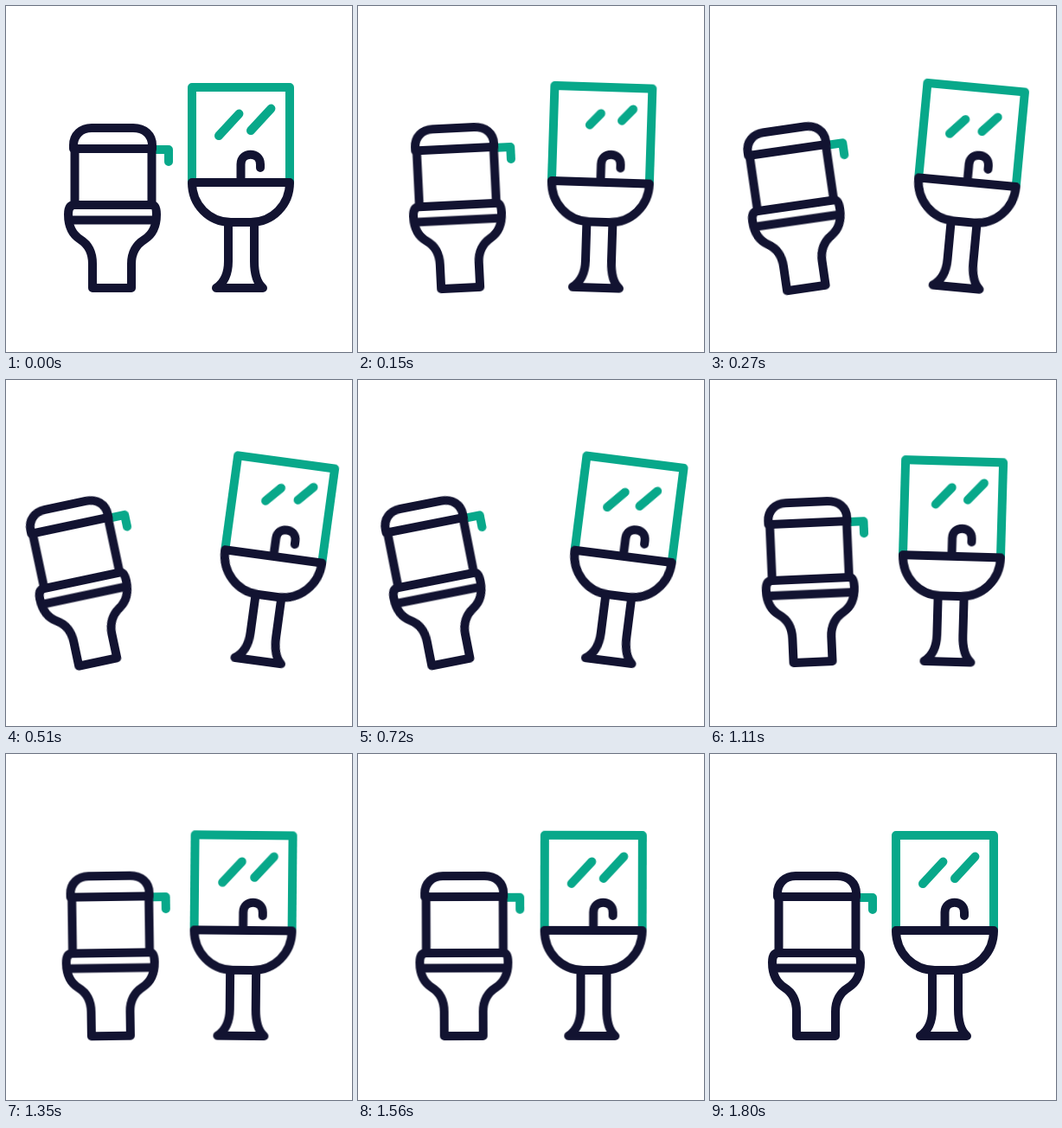
Write an HTML page that moves like this. It is 400 px wide and 400 px high and loops after 3.83 s.

```html
<!DOCTYPE html>
<html lang="en">
<head>
<meta charset="utf-8">
<title>Bathroom</title>
<style>
  html, body { margin: 0; width: 100%; height: 100%; overflow: hidden; background: #fff; }
  svg { display: block; width: 100%; height: 100%; }
  path { fill: none; stroke: #121331; stroke-width: 10; stroke-linecap: round; stroke-linejoin: round; }
  .accent { stroke: #08a88a; }
  .glint { stroke-dasharray: 34.6 22.4; }
  #toilet { transform-origin: 122.5px 326px; }
  #sink { transform-origin: 270px 326px; }
</style>
</head>
<body>
<svg viewBox="0 0 400 400">
  <g id="toilet">
    <path class="accent" d="M172 166H188V180"/>
    <path d="M78 165V161C78 149 87 141 99 141H147C160 141 169 149 169 161V165Z"/>
    <path d="M79.5 165V230M168.5 165V230"/>
    <path d="M79 230C74 230 72 234 72 241C72 257 78 265 86 270S100 284 100 298V326H145V298C145 284 152 275 160 270S174 257 174 241C174 234 173 230 168 230Z"/>
    <path d="M73 247.5H173"/>
  </g>
  <g id="sink">
    <path class="accent" d="M215 204V94H328V204"/>
    <path class="accent glint" d="M246 150L269.5 124.5"/>
    <path class="accent glint" d="M283 144L306.5 118.5"/>
    <path d="M271.5 203V183C271.5 168 294 168 294 183V187"/>
    <path d="M215 204H328C328 230 308 250 283 250H260C235 250 215 230 215 204Z"/>
    <path d="M257 252V295C257 309 252 320 243 326H297C290 320 287 309 287 295V252"/>
  </g>
</svg>
<script>
  const LOOP = 3830, STEP = 30, MOVE = 1800, PEAK = 540;
  const RISE = 'cubic-bezier(.4, 0, .34, 1)';
  const SETTLE = 'cubic-bezier(.39, 0, .07, 1)';
  const animations = [];

  // Swings out to the peak value, then settles back to rest.
  function swing(element, property, rest, peak, fall, end = MOVE) {
    const frames = [
      { [property]: rest, offset: 0, easing: RISE },
      { [property]: peak, offset: PEAK / MOVE, easing: fall },
      { [property]: rest, offset: end / MOVE }
    ];
    if (end < MOVE) frames.push({ [property]: rest, offset: 1 });
    const animation = element.animate(frames, { duration: MOVE, fill: 'both' });
    animation.pause();
    animations.push(animation);
  }

  const tilt = (x, y, angle) => `translate(${x}px, ${y}px) rotate(${angle}deg)`;
  const upright = tilt(0, 0, 0);
  swing(document.getElementById('toilet'), 'transform', upright, tilt(-16.3, 0, -12), SETTLE);
  swing(document.getElementById('sink'), 'transform', upright, tilt(21.3, -1.4, 7.8), SETTLE);
  for (const glint of document.querySelectorAll('.glint')) {
    swing(glint, 'strokeDashoffset', '0px', '-68.5px', 'cubic-bezier(.28, 0, 0, 1)', 1620);
  }

  const start = performance.now();
  function draw() {
    const time = (performance.now() - start) % LOOP;
    const pose = Math.min(Math.floor(time / STEP) * STEP, MOVE);
    for (const animation of animations) animation.currentTime = pose;
    requestAnimationFrame(draw);
  }
  draw();
</script>
</body>
</html>
```
